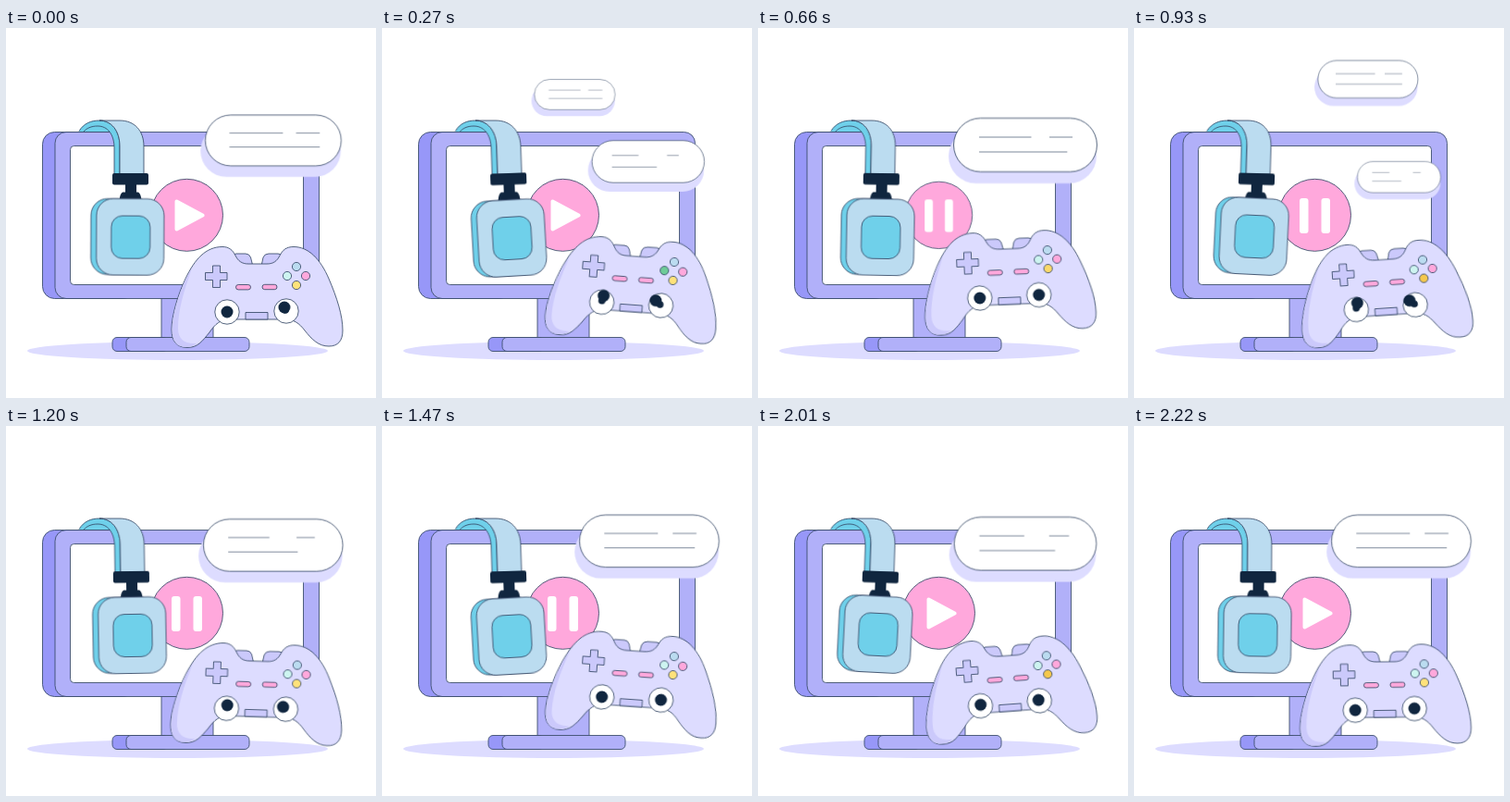
Animation, 400 px wide and 400 px high, one loop 2.25 s. Source, as an HTML page:

```html
<!DOCTYPE html>
<html lang="en">
<head>
<meta charset="utf-8">
<title>Game stream</title>
<style>
  html, body { margin: 0; width: 100%; height: 100%; overflow: hidden; background: #fff; }
  svg { display: block; width: 100%; height: 100%; }
  svg * { transform-box: view-box; }

  .o { stroke: #364866; stroke-width: .85; }
  .lilac { fill: #b1b0f9; }
  .violet { fill: #9797f8; }
  .pale { fill: #dddcff; }
  .mid { fill: #cbc9fb; }
  .pink { fill: #ffa8dc; }
  .sky { fill: #bbdcf0; }
  .teal { fill: #6fd0ea; }
  .dark { fill: #10263f; }
  .white { fill: #fff; }

  /* play / pause button */
  .press { transform-origin: 195.5px 202.3px; animation: press 2250ms linear infinite; }
  .play { animation: play 2250ms step-end infinite; }
  .pause { animation: pause 2250ms step-end infinite; }
  @keyframes press {
    0%, 24%, 33%, 69%, 78%, 100% { transform: scale(1); }
    28%, 73.3% { transform: scale(.9); }
  }
  @keyframes play { 0% { opacity: 1; } 28% { opacity: 0; } 73.3% { opacity: 1; } }
  @keyframes pause { 0% { opacity: 0; } 28% { opacity: 1; } 73.3% { opacity: 0; } }

  /* sine-like motions share one half period */
  .bob, .tilt, .strap, .swing, .lag {
    animation: 562.5ms cubic-bezier(.37, 0, .63, 1) -281.25ms infinite alternate;
  }
  .bob { animation-name: bob; animation-delay: 0s; }
  .tilt { animation-name: tilt; transform-origin: 271px 287px; }
  .strap { animation-name: strap; transform-origin: 134px 100px; }
  .swing { animation-name: swing; transform-origin: 134px 100px; }
  .lag { animation-name: lag; animation-delay: -206ms; transform-origin: 134px 170px; }
  @keyframes bob { to { transform: translateY(-17.5px); } }
  @keyframes tilt { from { transform: rotate(-4.2deg); } to { transform: rotate(4.2deg); } }
  @keyframes strap { from { transform: skewX(-2deg); } to { transform: skewX(2deg); } }
  @keyframes swing { from { transform: rotate(2deg); } to { transform: rotate(-2deg); } }
  @keyframes lag {
    from { transform: translateY(0) rotate(1deg); }
    to { transform: translateY(2px) rotate(-1.4deg); }
  }

  /* pupils and pad buttons */
  .look-l { animation: look-l 750ms linear infinite; }
  .look-r { animation: look-r 750ms linear infinite; }
  @keyframes look-l {
    0%, 72%, 100% { transform: translate(0, 0); }
    12%, 48% { transform: translate(1.5px, -7px); }
  }
  @keyframes look-r {
    0%, 100% { transform: translate(-2px, -4px); }
    8%, 48% { transform: translate(-6px, -5px); }
    72%, 96% { transform: translate(0, 0); }
  }
  .mint { animation: mint 1125ms linear infinite; }
  .gold { animation: gold 1125ms linear infinite; }
  @keyframes mint { 0%, 16%, 30%, 100% { fill: #cdf4f0; } 20%, 27% { fill: #6ecb98; } }
  @keyframes gold { 0%, 57%, 92%, 100% { fill: #ffe27a; } 62%, 84% { fill: #f5c84c; } }

  /* speech bubbles: one grows in while the last one flies off behind the screen */
  .ink { fill: none; stroke: #7b8799; stroke-width: 1; stroke-dasharray: 1; }
  .rise { animation: rise 750ms linear infinite, ink 750ms linear infinite; }
  .fly { animation: fly 750ms linear infinite; }
  .near { animation: near 750ms step-end infinite; }
  .far { animation: far 750ms step-end infinite; }
  @keyframes rise {
    0% { transform: translate(283px, 209px) scale(0); }
    4% { transform: translate(283px, 209px) scale(0); animation-timing-function: cubic-bezier(.33, 1, .68, 1); }
    84%, 88% { transform: translate(289px, 126.5px) scale(1); }
    96% { transform: translate(289px, 124.5px) scale(.974); }
    100% { transform: translate(289px, 121.8px) scale(.949); }
  }
  @keyframes ink { 0%, 4% { stroke-dashoffset: .6; } 100% { stroke-dashoffset: 0; } }
  @keyframes fly {
    0% { transform: translate(289px, 121.8px) scale(.949); }
    8% { transform: translate(286px, 108.5px) scale(.878); }
    16% { transform: translate(277px, 86px) scale(.795); }
    20% { transform: translate(267px, 70.5px) scale(.744); }
    24% { transform: translate(253.5px, 55.5px) scale(.699); }
    28% { transform: translate(236px, 52px) scale(.647); }
    32% { transform: translate(220px, 60px) scale(.603); }
    36% { transform: translate(208.5px, 71.5px) scale(.564); }
    40% { transform: translate(204.5px, 84px) scale(.545); }
    48% { transform: translate(203px, 112px) scale(.526); }
    56%, 100% { transform: translate(203px, 140px) scale(.513); }
  }
  @keyframes near { 0% { visibility: visible; } 22% { visibility: hidden; } }
  @keyframes far { 0% { visibility: hidden; } 22% { visibility: visible; } 56% { visibility: hidden; } }
</style>
</head>
<body>
<svg viewBox="0 0 400 400">
  <defs>
    <g id="bubble">
      <rect class="pale" x="-83" y="-17.5" width="160" height="59" rx="29.5"/>
      <rect class="white o" x="-77.5" y="-29" width="155" height="58" rx="29"/>
      <path class="ink" pathLength="1" d="M-50-8.5h61"/>
      <path class="ink" pathLength="1" d="M26-8.5h27"/>
      <path class="ink" pathLength="1" d="M-50 7.5h103"/>
    </g>
    <circle id="knob" r="4.6"/>
    <rect id="pill" width="16" height="5.4" rx="2.7"/>
  </defs>

  <ellipse class="pale" cx="185.5" cy="349" rx="162.5" ry="10"/>

  <g class="far"><use class="fly" href="#bubble"/></g>

  <!-- monitor -->
  <rect class="lilac o" x="168" y="285" width="56" height="52"/>
  <rect class="violet o" x="115" y="334.5" width="60" height="15" rx="5"/>
  <rect class="lilac o" x="130" y="334.5" width="133" height="15" rx="5"/>
  <rect class="violet o" x="39.5" y="112.5" width="100" height="180" rx="13"/>
  <rect class="lilac o" x="53" y="112.5" width="285.5" height="180" rx="12"/>
  <rect class="white o" x="69.5" y="127.5" width="252" height="150" rx="4"/>

  <g class="press">
    <circle class="pink o" cx="195.5" cy="202.3" r="39"/>
    <path class="play white" stroke="#fff" stroke-width="4" stroke-linejoin="round" d="M184.5 187.5V217.5L212.5 202.5Z"/>
    <g class="pause white">
      <rect x="179" y="184" width="9.5" height="38" rx="3"/>
      <rect x="202.5" y="184" width="9.5" height="38" rx="3"/>
    </g>
  </g>

  <!-- hanging headset -->
  <g class="strap o">
    <path class="teal" stroke="none" d="M79 112C84 103 92 100 101 100C109 100 115 104 119 112Z"/>
    <path class="teal" d="M79 111.5C84 103 92 100 101 100C114 100 123 111 123 128V158H117V130C117 115 110 106 99 106C92 106 87 108.500 84 112"/>
    <path class="sky" d="M101 100H123C139 100 149 111 149 128V158H123V128C123 111 114 100 101 100Z"/>
  </g>
  <g class="swing">
    <rect class="dark" x="115" y="157" width="39" height="12.5" rx="2"/>
    <path class="dark" d="M129 168H141V177.5H143Q146 179 146.5 187H122.5Q123 179 126 177.5H129Z"/>
    <g class="lag">
      <rect class="teal o" x="92" y="184" width="70" height="82" rx="18"/>
      <rect class="sky o" x="98" y="184" width="73" height="82.5" rx="18"/>
      <rect class="teal o" x="114" y="202.5" width="42" height="46" rx="12"/>
    </g>
  </g>

  <!-- controller -->
  <g class="bob"><g class="tilt">
    <g class="mid o">
      <path d="M243 262V248Q244 244 249 244H259Q263 244 264.5 248L268 262Z"/>
      <path d="M300 262V248Q299 244 294 244H284Q279.5 244 278 248L275 262Z"/>
    </g>
    <path class="pale o" d="M234 236.5C241 236.5 245 240 248 246C251 252 255 255 262 255H282C289 255 293 252 296 246C299 240 303 236.5 311 236.5C327 236.5 340 250 349 271C358 292 364 311 364 327C364 338 359 344 349 344C338 344 331 337 323 327C317 319 311 315 302 315H242C232 315 226 320 220 329C212 339 207 345.500 196 345.500C184 345.500 179 338 179 326C179 311 186 288 194 271C204 250 216 236.5 234 236.5Z"/>
    <path class="mid" d="M194.5 271C186.5 288 179.5 311 179.5 326C179.5 338 184 345 195 345C199 345 202 344 206 341C193 342 186 336 186 325C186 305 192 285 201 260Z"/>
    <path class="mid o" d="M223.5 257h8v7.5h7.5v8h-7.5v8h-8v-8h-8v-8h8Z"/>
    <g class="o">
      <use class="sky" href="#knob" x="314" y="258"/>
      <use class="mint" href="#knob" x="304" y="268"/>
      <use class="pink" href="#knob" x="324" y="268"/>
      <use class="gold" href="#knob" x="314" y="278"/>
      <use class="pink" href="#pill" x="248.5" y="277.5"/>
      <use class="pink" href="#pill" x="277" y="277.3"/>
      <path class="mid" d="M259 315V307.5H283V315Z"/>
      <circle class="white" cx="239" cy="307" r="13.2"/>
      <circle class="white" cx="303" cy="306" r="13.2"/>
    </g>
    <g class="dark">
      <circle cx="239" cy="305.5" r="3.8"/>
      <circle class="look-l" cx="239" cy="307" r="6.5"/>
      <circle cx="302" cy="305" r="3.8"/>
      <circle class="look-r" cx="303" cy="306" r="6.5"/>
    </g>
  </g></g>

  <g class="near"><use class="fly" href="#bubble"/></g>
  <use class="rise" href="#bubble"/>
</svg>
</body>
</html>
```
